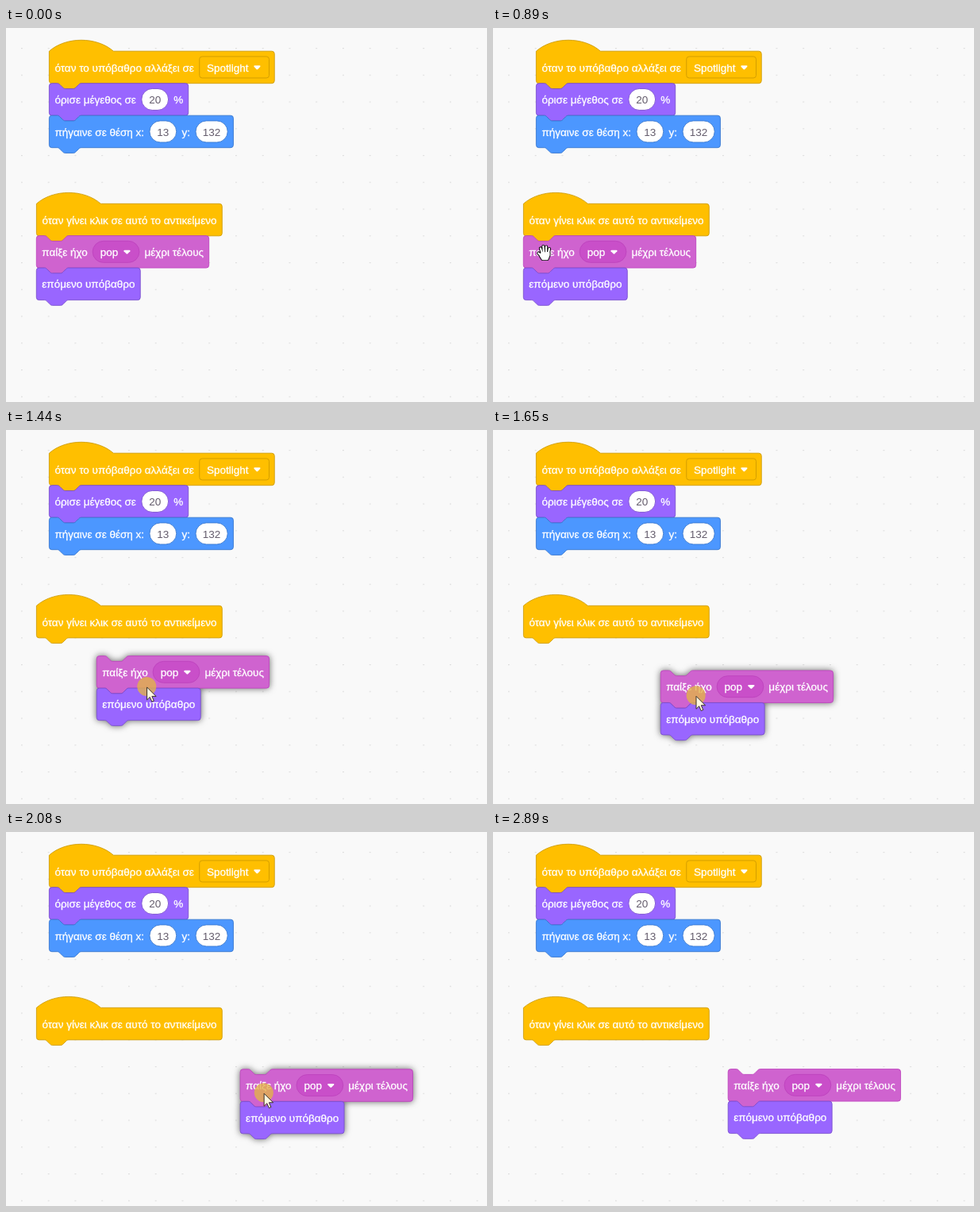
An HTML page that plays this animation: 606x471 px, repeating every 3420 ms.

```html
<!DOCTYPE html>
<html lang="el">
<head>
<meta charset="utf-8">
<title>Blocks</title>
<style>
  html, body { margin: 0; width: 100%; height: 100%; overflow: hidden; background: #f9f9f9; }
  svg { display: block; width: 606px; height: 471px; }
  text { font: 500 16px "Liberation Sans", Arial, sans-serif; fill: #fff; stroke: #fff; stroke-width: .35px; }
  .num { fill: #645c6c; stroke: none; text-anchor: middle; }
  .events { fill: #ffbf00; stroke: #cc9900; }
  .looks { fill: #9966ff; stroke: #774dcb; }
  .motion { fill: #4c97ff; stroke: #3373cc; }
  .sound { fill: #cf63cf; stroke: #bd42bd; }
  .menu { fill: #c94fc9; }
  .input { fill: #fff; }
  .caret { fill: #fff; stroke: none; }
  .lifted { filter: drop-shadow(0 0 4px rgba(0, 0, 0, .6)); }
  #hand { stroke-linecap: round; stroke-linejoin: round; }
</style>
</head>
<body>
<svg viewBox="0 0 606 471">
  <defs>
    <pattern id="dots" x="19" y="25" width="33.75" height="33.75" patternUnits="userSpaceOnUse">
      <rect width="1.8" height="1.2" fill="#ddd"/>
    </pattern>
    <path id="fingers" d="M-5-5.5L-3 1M-1.5-8L-1 0M2.2-7.5L2 0M6-5L5 1M-7.5 .5L-3.5 5M-4 1L5.5 0V3L3.5 8H-2.5L-5 4Z"/>
  </defs>
  <rect width="606" height="471" fill="url(#dots)"/>
  <g id="fixed"></g>
  <g id="moving"></g>
  <g id="cursor">
    <circle id="press" r="12" fill="#e2b445" opacity=".78"/>
    <path id="arrow" transform="translate(.3 1)" d="M0 0V16L3.7 12.5 6.2 18.3 8.8 17.2 6.3 11.5H11.5Z" fill="#fff8e0" stroke="#3a3026" stroke-linejoin="round"/>
    <g id="hand">
      <use href="#fingers" fill="#000" stroke="#000" stroke-width="4.2"/>
      <use href="#fingers" fill="#fff" stroke="#fff" stroke-width="2.3"/>
    </g>
  </g>
</svg>
<script>
const LOOP = 3420;
const STEP = 70;
const SCALE = 0.84375;
const ROW = 48;
const $ = id => document.getElementById(id);

// Block parts, in unscaled block units
const label = (x, s, cls = "") => `<text x="${x}" y="30" class="${cls}">${s}</text>`;
const field = (x, w, cls = "", r = 16) =>
  `<rect x="${x}" y="8" width="${w}" height="32" rx="${r}" class="${cls}"/>`;
const number = (x, w, n) => field(x, w, "input") + label(x + w / 2, n, "num");
const caret = x =>
  `<path class="caret" transform="translate(${x} 24.6)" d="M-4.6-1.4Q-5.6-3-3.8-3.1H3.8Q5.6-3 4.6-1.4L1 2.3Q0 3.2-1 2.3Z"/>`;

const HAT = "M0 0c25-22 71-22 96 0";
const NOTCH = "M0 4a4 4 0 0 1 4-4H12c2 0 3 1 4 2l4 4c1 1 2 2 4 2h12c2 0 3-1 4-2l4-4c1-1 2-2 4-2";
const BUMP = "H48c-2 0-3 1-4 2l-4 4c-1 1-2 2-4 2h-12c-2 0-3-1-4-2l-4-4c-1-1-2-2-4-2";

const block = (cls, w, ...parts) => ({ cls, w, parts });

function drawBlock({ cls, w, parts }, row) {
  const top = cls === "events" ? HAT : NOTCH;
  const d = `${top}H${w - 4}a4 4 0 0 1 4 4v40a4 4 0 0 1-4 4${BUMP}H4a4 4 0 0 1-4-4Z`;
  return `<g class="${cls}" transform="translate(0 ${row * ROW})"><path d="${d}"/>${parts.join("")}</g>`;
}

const stack = (x, y, blocks) =>
  `<g transform="translate(${x} ${y}) scale(${SCALE})">${blocks.map(drawBlock).join("")}</g>`;

const sizeScript = [
  block("events", 336.4, label(8.3, "όταν το υπόβαθρο αλλάξει σε"),
    field(224.4, 104, "", 4), label(235.3, "Spotlight"), caret(310.5)),
  block("looks", 207.8, label(8.3, "όρισε μέγεθος σε"), number(138, 40, 20), label(186, "%")),
  block("motion", 275, label(8.3, "πήγαινε σε θέση x:"), number(150, 40, 13),
    label(198, "y:"), number(218.8, 47.6, 132))
];
const clickScript = [block("events", 277.2, label(8.3, "όταν γίνει κλικ σε αυτό το αντικείμενο"))];
const dragged = [
  block("sound", 257.6, label(8.3, "παίξε ήχο"), field(84, 69.6, "menu"),
    label(95.3, "pop"), caret(135.3), label(161.4, "μέχρι τέλους")),
  block("looks", 155.2, label(8.3, "επόμενο υπόβαθρο"))
];

$("fixed").innerHTML = stack(54.4, 29.2, sizeScript) + stack(38.4, 221.3, clickScript);
$("moving").innerHTML = stack(0, 0, dragged);

// Motion: Bezier curves through a few points, eased and sampled every STEP ms
const clamp = u => Math.min(1, Math.max(0, u));
const easeOut = p => u => 1 - (1 - u) ** p;
const easeIn = p => u => u ** p;
const lerp = (a, b, u) => a.map((v, i) => v + (b[i] - v) * u);
const curve = (pts, u) => pts.length === 1 ? pts[0]
  : curve(pts.slice(1).map((p, i) => lerp(pts[i], p, u)), u);

const PHASES = [
  { start: 190, steps: 8, ease: easeOut(2), path: [[429, 461], [75, 280]] },
  { start: 750, steps: 7, ease: easeIn(1), path: [[75, 280], [57, 282], [68, 291]] },
  { start: 1300, steps: 13, ease: easeOut(2.1), path: [[68, 291], [154, 318], [240, 348], [326, 328]] },
  { start: 2540, steps: 6, ease: easeIn(1.8), path: [[326, 328], [541, 505]] }
];
const [, , DRAG, EXIT] = PHASES;
const DROP = DRAG.start + DRAG.steps * STEP;

// The block sets off a little after the pointer and catches up with it
const BLOCK = { delay: 15, time: 815, path: [[38.3, 261.6], [124, 289], [210, 316], [296.2, 298.6]] };

function cursorAt(t) {
  const { start, steps, ease, path } = PHASES.findLast(p => p.start <= t) || EXIT;
  const n = t < start ? steps : Math.floor((t - start) / STEP) + 1;
  return curve(path, ease(clamp(n / steps)));
}

function blockAt(t) {
  const elapsed = Math.floor((t - DRAG.start) / STEP) * STEP;
  return curve(BLOCK.path, DRAG.ease(clamp((elapsed - BLOCK.delay) / BLOCK.time)));
}

function isOver([x, y], [bx, by]) {
  const under = dragged[Math.floor((y - by) / SCALE / ROW)];
  return !!under && x >= bx && x <= bx + under.w * SCALE;
}

const show = (id, on) => $(id).style.display = on ? "" : "none";
const move = (id, [x, y]) => $(id).setAttribute("transform", `translate(${x} ${y})`);

function draw() {
  const t = performance.now() % LOOP;
  const pointer = cursorAt(t);
  const place = blockAt(t);
  const pressed = t >= DRAG.start && t < DROP;
  const hand = !pressed && isOver(pointer, place);
  move("cursor", pointer);
  move("moving", place);
  show("press", pressed);
  show("arrow", !hand);
  show("hand", hand);
  $("moving").classList.toggle("lifted", pressed);
  requestAnimationFrame(draw);
}
draw();
</script>
</body>
</html>
```
